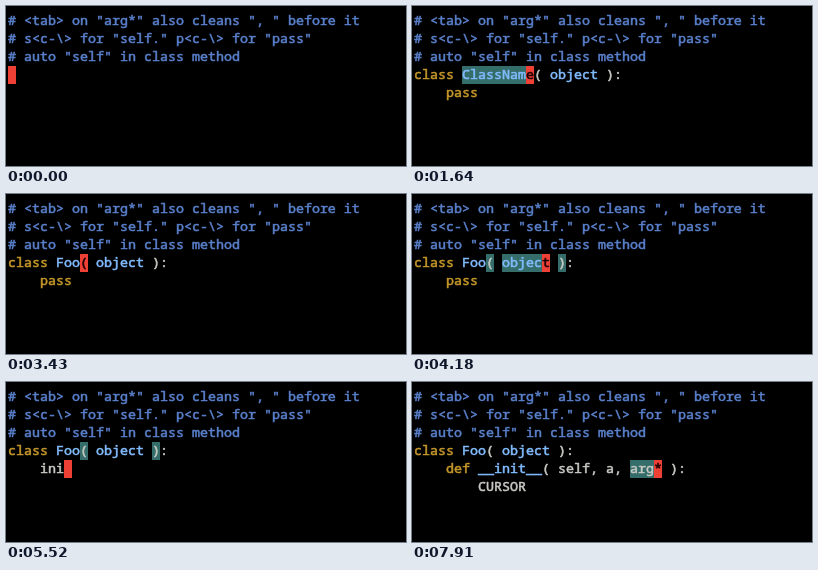
Recreate the animation shown at these times as an HTML page. Size 400x160 px, loop 8000 ms.

```html
<!DOCTYPE html>
<html lang="en">
<head>
<meta charset="utf-8">
<title>Snippet session</title>
<style>
  html, body { margin: 0; width: 100%; height: 100%; overflow: hidden; background: #000; }
  svg { display: block; width: 100%; height: 100%; }
  text {
    font: 13.333px "Noto Sans Mono", "DejaVu Sans Mono", monospace;
    font-variant-ligatures: none;
    white-space: pre;
    stroke-width: 0.55px;
    stroke-linejoin: round;
  }
</style>
</head>
<body>
<svg id="stage" viewBox="0 0 400 160">
  <rect width="400" height="160" fill="#000"/>
  <g id="boxes" shape-rendering="crispEdges"></g>
  <g id="lines"></g>
</svg>
<script>
const LOOP = 8000, CELL = 8, ROW = 18, LEFT = 2, TOP = 6, BASE = 13;
const INK = {
  comment: '#5a80cc', key: '#c6982a', name: '#82bcff',
  plain: '#c8cac4', under: '#1c0000', select: '#346d69', cursor: '#ee4035'
};
const COMMENTS = [
  '# <tab> on "arg*" also cleans ", " before it',
  '# s<c-\\> for "self." p<c-\\> for "pass"',
  '# auto "self" in class method'
];
const cls = name => `class ${name}( object ):`;
const init = args => `    def __init__( self, ${args} ):`;
const FOO = cls('Foo'), PASS = '    pass', BODY = '        CURSOR';

// at: start time, code: lines below the comments, cur: cursor [row, col],
// sel: selection [row, col, length], match: matching brackets lit
const steps = [
  { at: 0, code: [''], cur: [3, 0] },
  { at: 450, code: ['c'], cur: [3, 1] },
  { at: 750, code: ['cl'], cur: [3, 2] },
  { at: 900, code: ['cla'], cur: [3, 3] },
  { at: 1640, code: [cls('ClassName'), PASS], sel: [3, 6, 8], cur: [3, 14] },
  { at: 2240, code: [cls('ClassName'), PASS], sel: [3, 6, 8] },
  { at: 2990, code: [cls('F'), PASS], cur: [3, 7] },
  { at: 3290, code: [cls('Fo'), PASS], cur: [3, 8] },
  { at: 3430, code: [FOO, PASS], cur: [3, 9] },
  { at: 4030, code: [FOO, PASS], cur: [3, 11], match: true },
  { at: 4180, code: [FOO, PASS], sel: [3, 11, 5], cur: [3, 16], match: true },
  { at: 4630, code: [FOO, PASS], sel: [4, 4, 3], cur: [4, 7], match: true },
  { at: 5080, code: [FOO, '    i'], cur: [4, 5], match: true },
  { at: 5220, code: [FOO, '    i'], match: true },
  { at: 5370, code: [FOO, '    in'], cur: [4, 6], match: true },
  { at: 5520, code: [FOO, '    ini'], cur: [4, 7], match: true },
  { at: 6120, code: [FOO, init('arg*'), BODY], sel: [4, 24, 3], cur: [4, 27], match: true },
  { at: 7170, code: [FOO, init('arg*'), BODY], sel: [4, 24, 3], match: true },
  { at: 7320, code: [FOO, init('a'), BODY], cur: [4, 25], match: true },
  { at: 7770, code: [FOO, init('a'), BODY] },
  { at: 7910, code: [FOO, init('a, arg*'), BODY], sel: [4, 27, 3], cur: [4, 30] }
];

const boxes = document.getElementById('boxes');
const lines = document.getElementById('lines');

function add(parent, tag, attrs, text) {
  const el = document.createElementNS('http://www.w3.org/2000/svg', tag);
  for (const k in attrs) el.setAttribute(k, attrs[k]);
  if (text) el.textContent = text;
  parent.append(el);
  return el;
}

function box(row, col, len, fill) {
  add(boxes, 'rect', {
    x: LEFT + col * CELL, y: TOP + row * ROW, width: len * CELL, height: ROW, fill
  });
}

// Gives one colour key per character
function paint(text) {
  if (text[0] === '#') return Array(text.length).fill('comment');
  const inks = Array(text.length).fill('plain');
  const mark = (re, ink) => {
    for (const m of text.matchAll(re)) inks.fill(ink, m.index, m.index + m[0].length);
  };
  mark(/\b(class|def|pass|in)\b/g, 'key');
  mark(/(?<=(class|def) )\w+|\bobject\b/g, 'name');
  return inks;
}

function drawLine(text, row, cur) {
  const inks = paint(text);
  if (cur && cur[0] === row) inks[cur[1]] = 'under';
  const line = add(lines, 'text', { y: TOP + row * ROW + BASE });
  for (let i = 0, j; i < text.length; i = j) {
    for (j = i + 1; j < text.length && inks[j] === inks[i];) j++;
    const ink = INK[inks[i]];
    add(line, 'tspan', { x: LEFT + i * CELL, fill: ink, stroke: ink }, text.slice(i, j));
  }
}

function draw(step) {
  boxes.replaceChildren();
  lines.replaceChildren();
  if (step.match) {
    box(3, FOO.indexOf('('), 1, INK.select);
    box(3, FOO.indexOf(')'), 1, INK.select);
  }
  if (step.sel) box(...step.sel, INK.select);
  if (step.cur) box(...step.cur, 1, INK.cursor);
  [...COMMENTS, ...step.code].forEach((text, row) => drawLine(text, row, step.cur));
}

let shown, start;
function tick(now) {
  start ??= now;
  const t = (now - start) % LOOP;
  const step = steps.findLast(s => s.at <= t) || steps[0];
  if (step !== shown) draw(shown = step);
  requestAnimationFrame(tick);
}
draw(shown = steps[0]);
requestAnimationFrame(tick);
</script>
</body>
</html>
```
